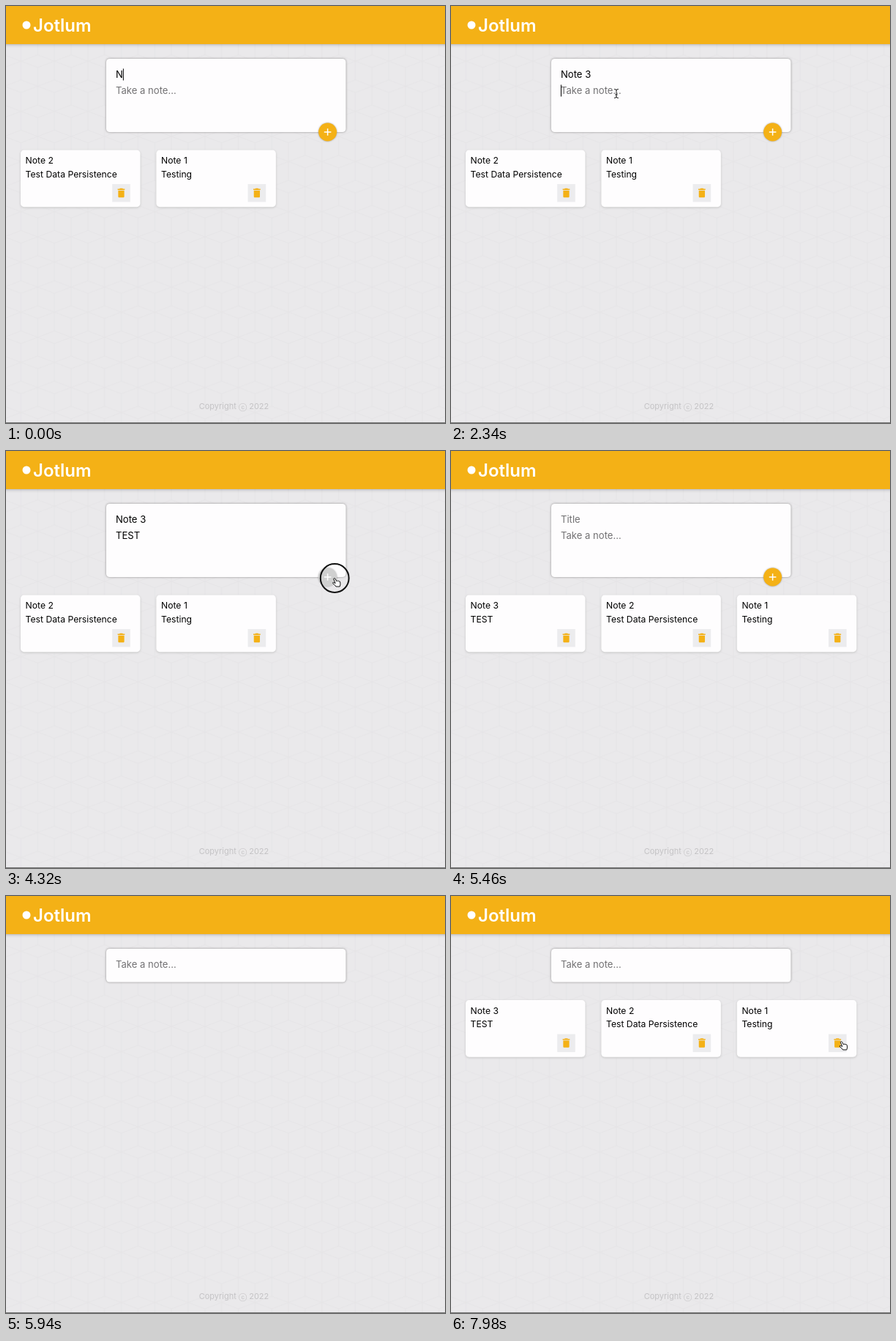
Animation of 600x569 px, one loop 8 s. Source, as an HTML page:

```html
<!DOCTYPE html>
<html lang="en">
<head>
<meta charset="utf-8">
<title>Notes</title>
<style>
  html, body { margin: 0; width: 100%; height: 100%; overflow: hidden; background: #eae9eb; }
  svg { display: block; width: 100vw; height: 100vh; font: 13.1px Inter, sans-serif; }
  text { white-space: pre; }
  .brand { font-size: 24px; font-weight: 600; fill: #fff; }
  .header { fill: #f4b116; filter: drop-shadow(0 0 2.5px rgba(0, 0, 0, .35)); }
  .form { fill: #fefdfe; filter: drop-shadow(0 .7px 1.7px #8a8989); }
  .card rect:first-child { fill: #fefdfe; filter: drop-shadow(0 1.2px 1.7px #c4c4c4); }
  .card text { font-size: 12.2px; }
  .footer { font-size: 11px; fill: #c4c3c5; text-anchor: middle; }
  .add circle { filter: drop-shadow(0 .8px 1.2px rgba(0, 0, 0, .35)); }
  .empty { fill: #727173; }
  .pointer { stroke-linejoin: round; stroke-linecap: round; }
</style>
</head>
<body>
<svg viewBox="0 0 600 569" preserveAspectRatio="none">
  <defs>
    <pattern id="cubes" width="45.7" height="68.5" x="20.5" y="41" patternUnits="userSpaceOnUse">
      <path fill="none" stroke="#e4e3e5" stroke-width=".9"
        d="M0 8.6L22.85 0L45.7 8.6M0 -8.6L22.85 0L45.7 -8.6M0 59.9L22.85 68.5L45.7 59.9
           M0 8.6V34.25M45.7 8.6V34.25M22.85 0V25.65
           M0 34.25L22.85 25.65L45.7 34.25L22.85 42.85L0 34.25V59.9M45.7 34.25V59.9M22.85 42.85V68.5"/>
    </pattern>
    <path id="trash" fill="#f4b116"
      d="M6 19c0 1.1.9 2 2 2h8c1.1 0 2-.9 2-2V7H6v12zM19 4h-3.5l-1-1h-5l-1 1H5v2h14V4z"/>
  </defs>

  <rect width="600" height="569" fill="#eae9eb"/>
  <rect width="600" height="569" fill="url(#cubes)"/>

  <g id="app">
    <rect class="header" x="-8" y="-8" width="616" height="60"/>
    <circle cx="28" cy="26" r="5.5" fill="#fff"/>
    <text class="brand" x="37" y="35">Jotlum</text>
    <rect class="form" id="form" x="137" y="72" width="327.5" rx="4.6"/>
    <text id="title" x="150" y="98.3"></text>
    <text id="content" x="150"></text>
    <rect id="caret" width="1" height="16"/>
    <g class="add" id="add">
      <circle id="addDisc" cx="439.6" cy="172" r="12.5"/>
      <path d="M434.8 172h9.6M439.6 167.2v9.6" stroke="#fff" stroke-width="1.5"/>
    </g>
    <g id="cards"></g>
    <text class="footer" x="311.5" y="550">Copyright ⓒ 2022</text>
  </g>
  <rect y="568" width="600" height="1" fill="#777"/>

  <circle id="ring" cx="449.2" cy="173.5" r="19.4" fill="none" stroke="#111" stroke-width="2"/>
  <g class="pointer" id="pointer">
    <g id="beam" fill="none">
      <path d="M-2.5 -6Q0 -6 0 -4.5Q0 -6 2.5 -6M0 -4.5V4.5M-2.5 6Q0 6 0 4.5Q0 6 2.5 6M-1.2 1.5H1.2"
        stroke="#fff" stroke-width="2.4"/>
      <path d="M-2.5 -6Q0 -6 0 -4.5Q0 -6 2.5 -6M0 -4.5V4.5M-2.5 6Q0 6 0 4.5Q0 6 2.5 6M-1.2 1.5H1.2"
        stroke="#111" stroke-width="1"/>
    </g>
    <path id="arrow" d="M0 0V9.6L2.2 7.6L3.8 11.2L5.5 10.4L4 7H7Z" fill="#000" stroke="#fff" stroke-width=".8"/>
    <path id="hand" fill="#fff" stroke="#111" stroke-width="1"
      d="M-1.3 .6Q-.2 -.6 .8 .8L2.4 4.2Q3.2 3 4.2 4Q5.2 3.2 6 4.4Q7.2 3.9 7.5 5.4Q8.3 8.6 7 11.5H1.8Q.5 9.4 -2.4 7.2Q-3 5.8 -1.6 5.8L.6 6.8Z"/>
  </g>
</svg>

<script>
const LOOP = 8000, STEP = 60;
const ADDED = 4380, RELOAD = 5820, SHELL = 5940, LOADED = 6000;

const titleKeys = [[0, "N"], [60, "No"], [180, "Not"], [360, "Note"], [420, "Note "], [480, "Note 3"], [ADDED, ""]];
const contentKeys = [[0, ""], [2640, "T"], [2820, "TE"], [2940, "TES"], [3060, "TEST"], [ADDED, ""]];
const caretKeys = [[0, "title"], [960, ""], [1140, "content"], [1560, ""], [2040, "content"],
  [2460, ""], [2640, "content"], [3540, ""], [4020, "content"], [4260, ""]];

// Each path: [time, x, y] points; the pointer is hidden outside them.
const paths = [
  { end: 2640, points: [[1140, 226, 119.5]] },
  { end: 4920, points: [[3420, 228, 120], [3660, 330, 136], [3840, 440, 152], [3960, 477, 166],
    [4080, 466, 176], [4200, 449.2, 173.5], [4560, 449.2, 173.5], [4740, 388, 118], [4860, 330, 62]] },
  { end: 5460, points: [[4920, 330, 62], [5280, 330, 62], [5400, 130, 30]] },
  { end: LOOP, points: [[6420, 72, 2], [6720, 99.6, 86.6], [6780, 101, 91], [7080, 101, 91],
    [7500, 330, 146], [7860, 533.8, 198.4]] }
];

const $ = id => document.getElementById(id);
const show = (el, on) => { el.style.display = on ? "" : "none"; };
const clamp = v => Math.min(1, Math.max(0, v));
const ease = u => u * u * (3 - 2 * u);
const current = (keys, t) => keys.findLast(([at]) => at <= t)[1];

const notes = [["Note 3", "TEST"], ["Note 2", "Test Data Persistence"], ["Note 1", "Testing"]];
$("cards").innerHTML = notes.map(([title, body]) => `
  <g class="card">
    <rect width="163.5" height="77.6" rx="4.6"/>
    <text x="6.6" y="18.6">${title}</text>
    <text x="6.6" y="37">${body}</text>
    <rect x="125.2" y="46.4" width="24.6" height="24.4" fill="#ececee"/>
    <use href="#trash" transform="translate(129.2 50.2) scale(.69)"/>
  </g>`).join("");
const cards = [...$("cards").children];

function pointerAt(t) {
  const path = paths.find(p => t >= p.points[0][0] && t < p.end);
  if (!path) return null;
  const i = path.points.findLastIndex(p => p[0] <= t);
  const a = path.points[i], b = path.points[i + 1] || a;
  const u = b === a ? 0 : ease((t - a[0]) / (b[0] - a[0]));
  return { x: a[1] + (b[1] - a[1]) * u, y: a[2] + (b[2] - a[2]) * u };
}

function pointerKind({ x, y }, open) {
  if (open && Math.hypot(x - 439.6, y - 172) < 12.5) return "hand";
  if (!open && x > 516 && x < 541 && y > 188 && y < 213) return "hand";
  const inField = x > 148 && x < 453 && y > 84 && y < (open ? 158 : 106);
  return inField ? "beam" : "arrow";
}

function setField(el, value, placeholder) {
  el.textContent = value || placeholder;
  el.classList.toggle("empty", !value);
}

function drawForm(t, open) {
  $("form").setAttribute("height", open ? 100 : 45.5);
  show($("title"), open);
  show($("add"), open);
  const title = current(titleKeys, t), content = current(contentKeys, t);
  setField($("title"), title, "Title");
  setField($("content"), content, "Take a note...");
  $("content").setAttribute("y", open ? 120.2 : 98.3);

  const focus = current(caretKeys, t);
  show($("caret"), focus);
  if (focus) {
    const typed = focus === "title" ? title : content;
    $("caret").setAttribute("x", 150 + (typed ? $(focus).getComputedTextLength() : 0));
    $("caret").setAttribute("y", focus === "title" ? 85.5 : 107.5);
  }

  const hover = clamp((t - 4080) / 180) - clamp((t - 4620) / 240);
  const mix = (from, to) => Math.round(from + (to - from) * hover);
  $("addDisc").setAttribute("fill", `rgb(${mix(244, 208)},${mix(177, 208)},${mix(22, 208)})`);
}

function drawCards(t, open) {
  const hidden = t >= SHELL && t < LOADED;
  const first = t < ADDED ? 1 : 0;
  cards.forEach((card, i) => {
    show(card, !hidden && i >= first);
    card.setAttribute("transform", `translate(${20 + 185.4 * (i - first)} ${open ? 196.6 : 142.1})`);
  });
}

function drawPointer(t, open) {
  const p = pointerAt(t);
  show($("pointer"), p);
  show($("ring"), t >= 4260 && t < ADDED);
  if (!p) return;
  const kind = pointerKind(p, open);
  for (const id of ["beam", "arrow", "hand"]) show($(id), id === kind);
  $("pointer").setAttribute("transform", `translate(${p.x} ${p.y})`);
}

function draw() {
  const t = Math.floor(performance.now() % LOOP / STEP) * STEP;
  const open = t < RELOAD;
  show($("app"), t < RELOAD || t >= SHELL);
  drawForm(t, open);
  drawCards(t, open);
  drawPointer(t, open);
  requestAnimationFrame(draw);
}
draw();
</script>
</body>
</html>
```
